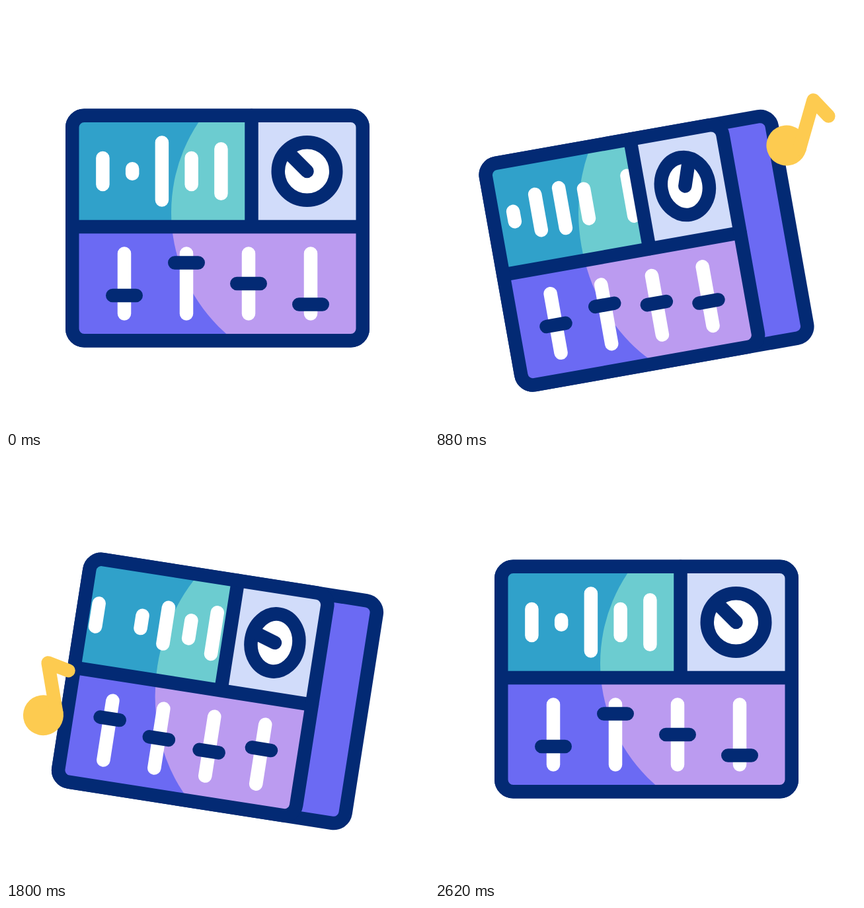
Write an HTML page that moves like this. It is 640 by 640 pixels and loops after 3 s.

```html
<!DOCTYPE html>
<html lang="en">
<head>
<meta charset="utf-8">
<title>Music mixer</title>
<style>
  html, body { margin: 0; width: 100%; height: 100%; overflow: hidden; background: #fff; }
  svg { display: block; width: 100%; height: 100%; }
</style>
</head>
<body>
<svg id="stage" viewBox="0 0 640 640"></svg>
<script>
const LOOP = 3000;
const NAVY = '#032a74', TEAL = '#30a1ca', AQUA = '#6cccd0', VIOLET = '#6b6af3',
      LILAC = '#bb9bf0', PALE = '#d1dcfa', WHITE = '#fff', YELLOW = '#fdcb50';
const W = 20.5;                // line weight
const HX = 219.75, HY = 170.3; // half size of the case, on its centre line
const MID = -2, SPLIT = 51.5;  // dividers

function set(node, attrs) {
  for (const key in attrs) node.setAttribute(key, attrs[key]);
  return node;
}
function add(parent, tag, attrs) {
  const node = document.createElementNS('http://www.w3.org/2000/svg', tag);
  parent.appendChild(node);
  return set(node, attrs || {});
}
function stroke(parent, color) {
  return add(parent, 'path', { fill: 'none', stroke: color, 'stroke-width': W,
    'stroke-linecap': 'round', 'stroke-linejoin': 'round' });
}
function clip(id) {
  return add(add(defs, 'clipPath', { id }), 'rect');
}

const smooth = p => { p = Math.min(1, Math.max(0, p)); return p * p * (3 - 2 * p); };
const ramp = (t, a, b) => smooth((t - a) / (b - a));
const mix = (a, b, p) => a + (b - a) * p;

// eased value between keys
function track(t, times, vals) {
  let i = 0;
  while (i < times.length - 2 && t > times[i + 1]) i++;
  return mix(vals[i], vals[i + 1], ramp(t, times[i], times[i + 1]));
}

// ease with a slightly longer landing, solved by bisection
function glide(p) {
  if (p <= 0) return 0;
  if (p >= 1) return 1;
  let lo = 0, hi = 1;
  for (let i = 0; i < 24; i++) {
    const s = (lo + hi) / 2, q = 1 - s;
    if (q * q * s + 1.9 * q * s * s + s * s * s < p) lo = s; else hi = s;
  }
  return smooth(lo);
}

const svg = document.getElementById('stage');
const defs = add(svg, 'defs');
const topClip = clip('top'), lowClip = clip('low');

const box = add(svg, 'g');
add(box, 'rect', { x: -HX, y: -HY, width: 2 * HX, height: 2 * HY, rx: 18,
  fill: VIOLET, stroke: NAVY, 'stroke-width': W });

const low = add(box, 'g', { 'clip-path': 'url(#low)' });
add(low, 'rect', { x: -HX, y: MID, width: 2 * HX, height: HY - MID, fill: VIOLET });
const lowGlow = add(low, 'ellipse', { cy: -24, ry: 245, fill: LILAC });

const knobPanel = add(box, 'rect', { y: -HY, height: HY + MID, fill: PALE });

const wave = add(box, 'g', { 'clip-path': 'url(#top)' });
add(wave, 'rect', { x: -HX, y: -HY, width: 2 * HX, height: HY + MID, fill: TEAL });
const topGlow = add(wave, 'ellipse', { cy: -24, ry: 245, fill: AQUA });
const bars = stroke(wave, WHITE);

const slots = stroke(box, WHITE);
const grips = stroke(box, NAVY);
const knob = add(box, 'ellipse', { cy: -86, ry: 43.75, fill: WHITE, stroke: NAVY, 'stroke-width': W });
const pointer = stroke(box, NAVY);
const dividers = stroke(box, NAVY);
const frame = add(box, 'rect', { x: -HX, y: -HY, height: 2 * HY, rx: 18,
  fill: 'none', stroke: NAVY, 'stroke-width': W });

// bars ripple in threes, level out, then alternate and rise to the right
const BAR_REST = [60.5, 28, 107.5, 60.5, 88];
function barLength(rest, i, t) {
  const threes = 64 + 40 * Math.cos(i * 2 * Math.PI / 3);
  const twos = 64 - 16 * Math.cos(i * Math.PI) + 4 * (i - 2);
  return track(t, [600, 1160, 1460, 1800, 2250], [rest, threes, 56, twos, rest]);
}

// a grip goes out to its reach, to the far end, and to its reach again
const SLIDERS = [
  { rest: 102, reach: 66, late: 1700 },
  { rest: 52.5, reach: 84, late: 1500 },
  { rest: 84, reach: 104, late: 2100 },
  { rest: 115.5, reach: 76, late: 1650 }
];
function gripHeight({ rest, reach, late }, t) {
  const far = reach < 80 ? 112 : 52;
  return track(t, [200, 640, 1160, late, 2101, 2620], [rest, reach, far, reach, reach, rest]);
}

// each value pair runs from start to end
const notes = [
  { start: 640, x: [528.4, 550.8], y: [233, 93.3], turn: [22.7, -20.5] },
  { start: 1300, x: [73.3, 41.6], y: [469.4, 321.7], turn: [-41, 18] }
];
for (const n of notes) {
  n.g = add(svg, 'g');
  add(n.g, 'circle', { r: 30.5, fill: YELLOW });
  set(stroke(n.g, YELLOW), { d: 'M20.25 0V-77L48.75 -60.2' });
}

function drawNote(n, t) {
  const end = n.start + 960;
  const size = ramp(t, n.start - 40, n.start + 80) * (1 - ramp(t, end - 40, end + 40));
  n.g.style.display = size > 0 ? '' : 'none';
  const p = ramp(t, n.start, end);
  const at = pair => mix(pair[0], pair[1], p);
  set(n.g, { transform: `translate(${at(n.x)} ${at(n.y)}) rotate(${at(n.turn)}) ` +
    `translate(20 -25) scale(${size}) translate(-20 25)` });
}

function draw(t) {
  const dy = track(t, [200, 800, 1400, 2000, 2600], [0, 38, -38, 38, 0]);
  const tilt = track(t, [200, 900, 1600, 2100, 2600], [0, -10.1, 18.1, -7.9, 0]);
  set(box, { transform: `translate(320 ${336 + dy}) rotate(${tilt})` });

  // the front narrows towards its left edge; line weights stay
  const k = 1 - track(t, [200, 700, 2100, 2600], [0, 75.4, 75.4, 0]) / (2 * HX);
  const X = x => (x + HX) * k - HX;
  const right = X(HX), split = X(SPLIT);

  set(lowClip, { x: -HX, y: MID, width: right + HX, height: HY - MID });
  set(topClip, { x: -HX, y: -HY, width: split + HX, height: HY + MID });
  set(knobPanel, { x: split, width: right - split });
  for (const glow of [lowGlow, topGlow]) set(glow, { cx: X(175), rx: 245 * k });
  set(frame, { width: right + HX });
  set(dividers, { d: `M${-HX} ${MID}H${right}M${split} ${-HY}V${MID}` });

  const scroll = 261 * glide((t - 200) / 2400);
  let barPath = '';
  for (let group = 0; group < 2; group++) {
    BAR_REST.forEach((rest, i) => {
      const half = (barLength(rest, i, t) - W) / 2;
      barPath += `M${X(-173.6 + 44.75 * i + 261 * group - scroll)} ${-86 - half}v${2 * half}`;
    });
  }
  set(bars, { d: barPath });

  let slotPath = '', gripPath = '';
  SLIDERS.forEach((slider, i) => {
    const x = -141 + 94 * i;
    slotPath += `M${X(x)} 38.5V129.5`;
    gripPath += `M${X(x - 17.75)} ${gripHeight(slider, t)}H${X(x + 17.75)}`;
  });
  set(slots, { d: slotPath });
  set(grips, { d: gripPath });

  const turn = track(t, [600, 1000, 1600, 2200], [-45, 40, -86, -45]) * Math.PI / 180;
  set(knob, { cx: X(135.5), rx: 43.75 * k });
  set(pointer, { d: `M${X(135.5)} -86L${X(135.5 + 40 * Math.sin(turn))} ${-86 - 40 * Math.cos(turn)}` });

  for (const n of notes) drawNote(n, t);
}

const begin = performance.now();
function tick() {
  draw((performance.now() - begin) % LOOP);
  requestAnimationFrame(tick);
}
tick();
</script>
</body>
</html>
```
